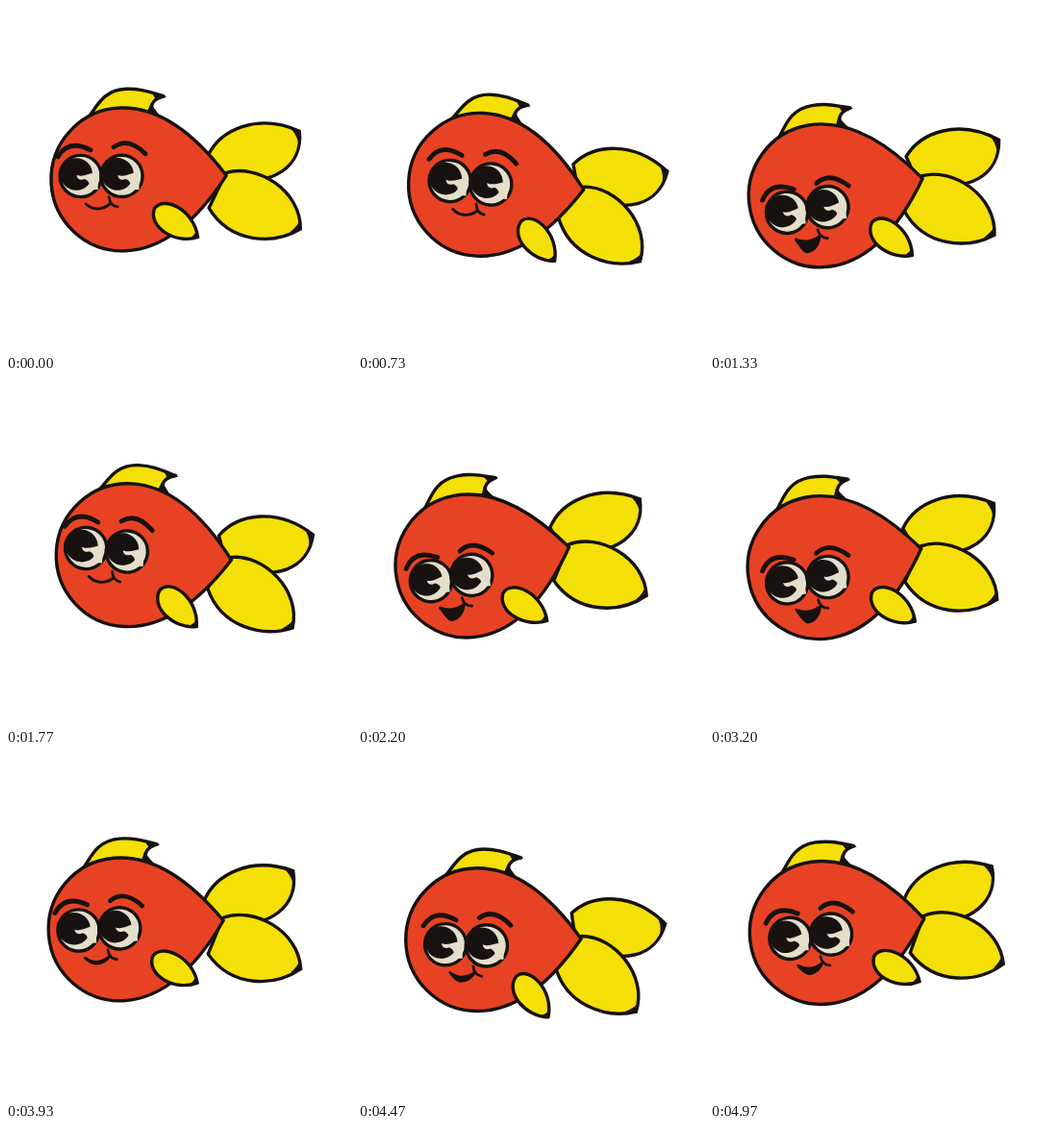
Write an HTML page that moves like this. It is 360 px wide and 360 px high and loops after 5 s.

```html
<!DOCTYPE html>
<html lang="en">
<head>
<meta charset="utf-8">
<title>Goldfish</title>
<style>
  html, body { margin: 0; width: 100%; height: 100%; overflow: hidden; background: #fff; }
  svg { display: block; width: 100vw; height: 100vh; }
  .line { stroke: #17120f; stroke-width: 3.4; stroke-linecap: round; stroke-linejoin: round; }
  .yellow { fill: #f4df06; }
  .red { fill: #e84225; }
  .cream { fill: #e4dfcb; }
  .ink { fill: #17120f; }
  .open { fill: none; }
  .brow { stroke-width: 4.8; }
  .lip { stroke-width: 2.8; }
</style>
</head>
<body>
<svg viewBox="0 0 360 360">
  <defs>
    <g id="eye">
      <circle class="cream line" r="21.6"/>
      <circle class="ink" cx="-4.5" cy="-2" r="16.8"/>
      <path class="cream" d="M18-3C11-5 4 2-4-1C-4 3 0 5 4 3C9 5 10 9 9 14L18 14Z"/>
    </g>
  </defs>

  <g id="upperFin">
    <path class="yellow line" d="M-5-28C20-44 62-39 89 0C74 32 36 38-6 0Z"/>
    <path class="ink" d="M91 0L82-9Q85 0 82 9Z"/>
  </g>
  <g id="lowerFin">
    <path class="yellow line" d="M-2-2C18-29 72-33 95 0C82 30 45 55 5 38Z"/>
    <path class="ink" d="M97 0L89-8Q91 0 88 9Z"/>
  </g>

  <g id="fish">
    <path class="yellow line" d="M-37-62C-26-71-20-94 7-94C22-94 31-90 46-85C36-83 31-77 34-71L42-60Z"/>
    <path class="ink" d="M-41-59L-28-73L-22-67ZM32-78L48-55L28-69ZM33-90L49-84L38-81Z"/>
    <path class="red line" d="M108 0C87-30 50-74.4 0-74.4A74.4 74.4 0 0 0 0 74.4C50 74.4 87 30 108 0Z"/>
    <g id="face">
      <path id="brows" class="open line brow" d="M-46-19Q-35-38-12-26M12-29Q27-40 45-22"/>
      <use href="#eye" x="-21.4"/>
      <use href="#eye" x="21.4"/>
      <path id="mouth" class="ink line lip"/>
      <path class="open line lip" d="M8 22Q9 31 17 32"/>
    </g>
  </g>

  <g id="sideFin">
    <path class="yellow line" d="M0 0C0-17 35-22 54 0C39 19 5 20 0 0Z"/>
    <path class="ink" d="M56 0L49-6Q50 0 48 6Z"/>
  </g>
</svg>
<script>
  const LOOP = 5000;
  const BOB = 2900 / 3;   // one bob of the body
  const TURN = 2 * BOB;   // one sideways turn of the face
  const RAD = Math.PI / 180;

  const part = id => document.getElementById(id);
  const [upperFin, lowerFin, fish, face, brows, mouth, sideFin] =
    ['upperFin', 'lowerFin', 'fish', 'face', 'brows', 'mouth', 'sideFin'].map(part);

  const place = (el, x, y, angle) =>
    el.setAttribute('transform', `translate(${x} ${y}) rotate(${angle})`);

  function mouthPath(gape) {
    return `M-16 29Q-4 ${39 - 3 * gape} 9 29` +
      `C7 ${31 + 6 * gape} 2 ${34 + 9 * gape} ${-4 - 2 * gape} ${34 + 9.5 * gape}` +
      `C${-9 - gape} ${34 + 9 * gape} -13 ${32 + 2 * gape} -16 29Z`;
  }

  function draw(ms) {
    // mean + amplitude * cosine peaking at the given phase in degrees
    const wave = period => (mean, amp, peak) =>
      mean + amp * Math.cos((ms / period * 360 - peak) * RAD);
    const bob = wave(BOB);
    const turn = wave(TURN);

    const x = bob(120.2, 6.8, 280);
    const y = bob(189.1, 9.2, 161);
    const tilt = bob(-3.8, 6.7, 285);
    const c = Math.cos(tilt * RAD), s = Math.sin(tilt * RAD);
    const onBody = (px, py) => [x + px * c - py * s, y + px * s + py * c];

    place(fish, x, y, tilt);
    place(upperFin, ...onBody(108, 0), bob(-23.8, 14, 238));
    place(lowerFin, ...onBody(108, 0), bob(41.5, 12, 242));
    place(sideFin, ...onBody(turn(41, 10, 205), bob(35, 3.5, 200)), bob(40.5, 12, 233));
    place(face, turn(-16, 6.5, 161), bob(3.4, 9, 149), 2);
    place(brows, 1, bob(0.5, 2.5, 130), 0);
    mouth.setAttribute('d', mouthPath(Math.min(1, Math.max(0, bob(0.4, 0.7, 135)))));
  }

  const start = performance.now();
  function tick() {
    draw((performance.now() - start) % LOOP);
    requestAnimationFrame(tick);
  }
  tick();
</script>
</body>
</html>
```
